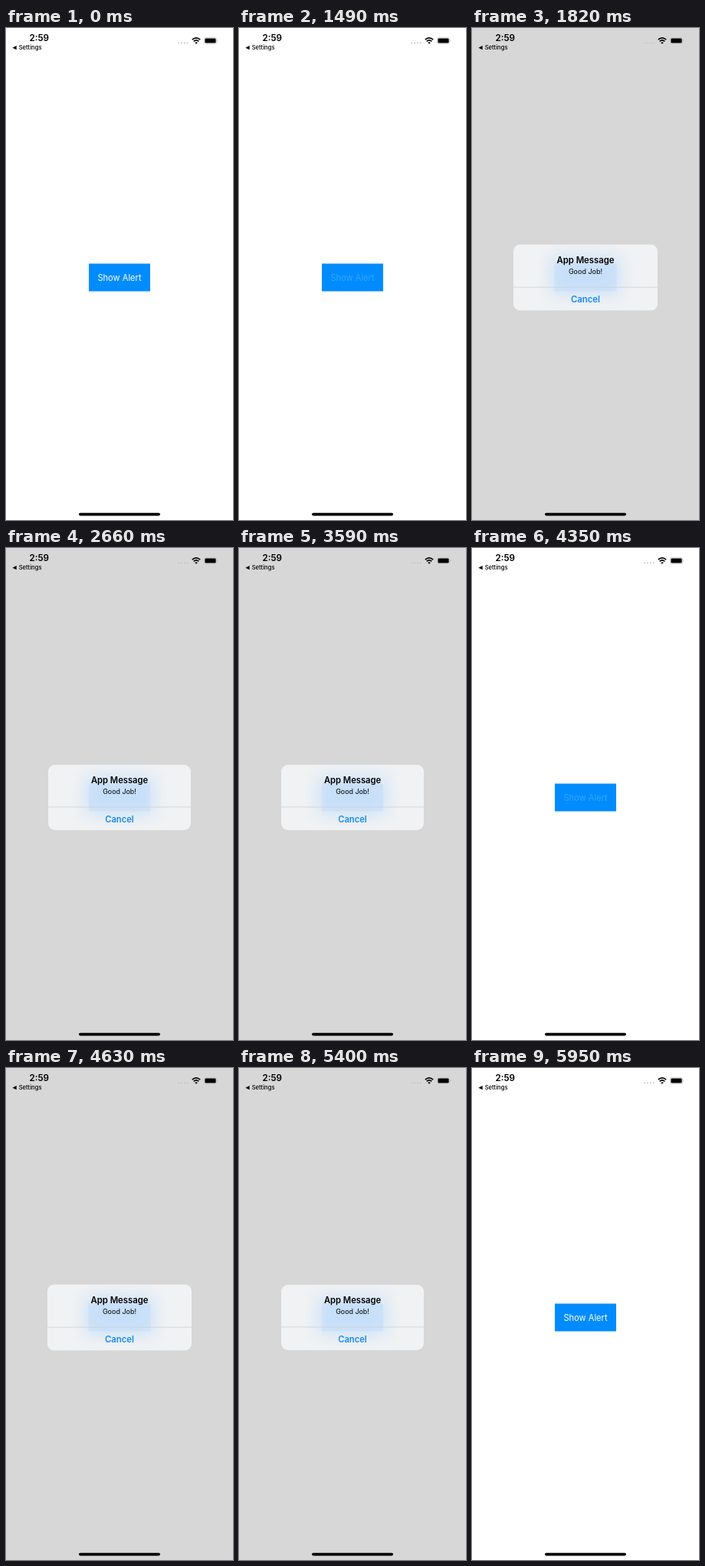
Write an HTML page that moves like this. It is 296 by 640 pixels and loops after 5980 ms.

```html
<!DOCTYPE html>
<html lang="en">
<head>
<meta charset="utf-8">
<style>
  html, body { margin: 0; width: 100%; height: 100%; overflow: hidden; background: #fff; }
  svg { display: block; width: 296px; height: 640px; font-family: Inter, sans-serif; }
  .mid { text-anchor: middle; }
  .semi { font-weight: 600; }
</style>
</head>
<body>
<svg viewBox="0 0 296 640">
  <defs>
    <filter id="blur" x="-50%" y="-100%" width="200%" height="300%"><feGaussianBlur stdDeviation="11"/></filter>
    <clipPath id="card"><rect x="55" y="282" width="186" height="85" rx="9"/></clipPath>
  </defs>

  <rect x="108" y="306.5" width="80" height="36" fill="#008cff"/>
  <text id="label" class="mid" x="148" y="328.8" font-size="11.1" fill="#fff">Show Alert</text>

  <rect id="dim" width="296" height="640" fill-opacity=".157"/>

  <g id="status">
    <text class="mid semi" x="43.2" y="16.6" font-size="11.7">2:59</text>
    <path d="M8.5 25.7 L13.7 23.1 V28.3 Z"/>
    <text x="16.7" y="28.4" font-size="7.6" font-weight="500">Settings</text>
    <path d="M225.3 19.5 H238" stroke="#c6c6c6" stroke-width="2" stroke-linecap="round" stroke-dasharray="0 3.8" fill="none"/>
    <g fill="none" stroke="#000" stroke-width="1.7">
      <path d="M242.8 15.2 Q248 10.5 253.2 15.2"/>
      <path d="M244.7 17.4 Q248 14.3 251.3 17.4"/>
    </g>
    <path d="M246.2 18.9 Q248 17.4 249.8 18.9 L248 20.7 Z"/>
    <rect x="258.3" y="12.3" width="16.4" height="8.4" rx="2.4" fill="none" stroke="#c8c8c8" stroke-width=".8"/>
    <rect x="259.4" y="13.4" width="14.2" height="6.2" rx="1.4"/>
    <path d="M275.7 15 Q277 16.5 275.7 18 Z" fill="#999"/>
  </g>

  <g id="alert">
    <g clip-path="url(#card)">
      <rect x="55" y="282" width="186" height="85" fill="#f1f2f3"/>
      <rect x="104" y="298" width="88" height="48" fill="#c9e1fa" filter="url(#blur)"/>
      <rect x="108" y="306.5" width="80" height="36" fill="#c3def9" opacity=".5"/>
      <path d="M55 337 H241" stroke="#c9cbce" stroke-width=".7"/>
    </g>
    <text class="mid semi" x="148" y="306.2" font-size="11.2">App Message</text>
    <text class="mid" x="148" y="320.3" font-size="8.9">Good Job!</text>
    <text class="mid semi" x="148" y="356.6" font-size="11.2" fill="#148af5">Cancel</text>
  </g>

  <rect x="95" y="630.8" width="106" height="3.6" rx="1.8"/>
</svg>
<script>
  const LOOP = 5980;
  const $ = id => document.getElementById(id);

  // Each track holds its value until the next [time, value] pair.
  const pressed = [[0, 0], [1490, 1], [1820, 0], [4350, 1], [4630, 0]];
  const shown = [
    [0, 0], [1820, 1], [3710, .4], [3840, .03], [3980, 0],
    [4630, 1], [5530, .45], [5640, .08], [5740, .02], [5840, 0]
  ];
  const scale = [[0, 1], [1820, 1.012], [2010, 1], [4630, 1.012], [4820, 1]];

  const at = (track, t) => track.findLast(([start]) => start <= t)[1];

  function draw(t) {
    const alpha = at(shown, t);
    $('label').setAttribute('opacity', at(pressed, t) ? .2 : 1);
    $('dim').setAttribute('opacity', alpha);
    $('alert').setAttribute('opacity', alpha);
    $('alert').setAttribute('transform',
      `translate(148 324.5) scale(${at(scale, t)}) translate(-148 -324.5)`);
  }

  const begin = performance.now();
  function tick() {
    draw((performance.now() - begin) % LOOP);
    requestAnimationFrame(tick);
  }
  tick();
</script>
</body>
</html>
```
